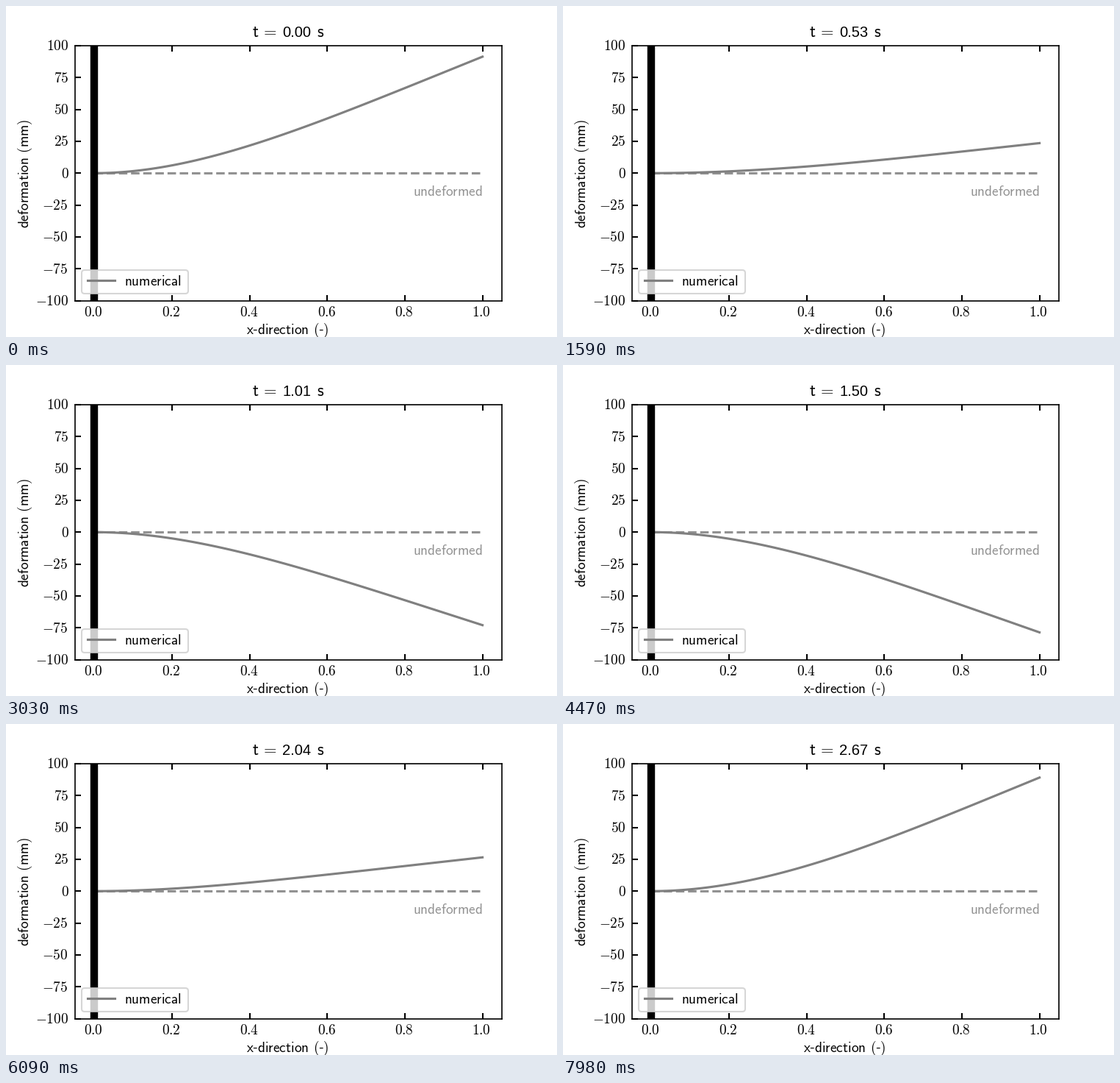
Write a matplotlib script that moves like this. It is 750 by 450 pixels and loops after 8000 ms.

```python
import matplotlib.pyplot as plt
import numpy as np
from matplotlib.animation import FuncAnimation
from matplotlib.patches import FancyBboxPatch

W, H, DPI = 750, 450, 150
LOOP, TICK, STEP = 8000, 20, 30   # ms
DT = 0.01004                      # simulated seconds per step
GRAY, LIGHT = "#808080", "#929292"

plt.rcParams.update({
    "font.family": "Liberation Sans",
    "font.size": 9.25,
    "mathtext.fontset": "cm",
    "axes.linewidth": 0.8,
    "lines.linewidth": 1.5,
})

fig = plt.figure(figsize=(W / DPI, H / DPI), dpi=DPI, facecolor="white")
ax = fig.add_axes([0.125, 0.11, 0.775, 0.77])
ax.set_xlim(-0.05, 1.05)
ax.set_ylim(-100, 100)
ax.set_xticks(np.arange(6) / 5)
ax.set_yticks(np.arange(-100, 101, 25))
ax.tick_params(direction="in", length=4, width=1, top=True,
               labelbottom=False, labelleft=False)

# overlay in pixel coordinates, y pointing down
ui = fig.add_axes([0, 0, 1, 1], zorder=2)
ui.set_xlim(0, W)
ui.set_ylim(H, 0)
ui.axis("off")


def sans(s):
    """Sans-serif math text; hyphens stay outside math mode."""
    s = s.replace(" =", r"\hspace{0.18}=").replace(" ", r"\hspace{0.38}")
    parts = [r"$\mathsf{%s}$" % p if p else "" for p in s.split("-")]
    return "-".join(parts)


def label(x, y, s, ha="center", **kw):
    return ui.text(x, y, s, ha=ha, va="baseline", **kw)


def number(x, y, s, ha):
    """Tick label, moved left by the blank edge of its first glyph."""
    edge = 1.7 if s[0] in "-1" else 0.8
    label(x - edge, y, "$%s$" % s, ha)


# cantilever vibration modes, scaled to one at the free end
def mode(beta, sigma, x):
    def raw(z):
        return np.cosh(z) - np.cos(z) - sigma * (np.sinh(z) - np.sin(z))
    return raw(beta * x) / raw(beta)


AMP, MIX = 91.4, 0.0078
OMEGA, PHASE = 2.4555, 0.008
RATIO = (4.69409 / 1.87510) ** 2
x = np.linspace(0, 1, 101)
first = mode(1.87510, 0.734096, x)
second = mode(4.69409, 1.018467, x)


def shape(t):
    return AMP * ((1 + MIX) * first * np.cos(OMEGA * t + PHASE)
                  - MIX * second * np.cos(RATIO * OMEGA * t))


ax.plot([0, 1], [0, 0], "--", color=LIGHT, zorder=2)
beam, = ax.plot(x, shape(0), color=GRAY, zorder=3)
ax.plot([0, 0], [-100, 100], color="black", lw=5, zorder=4)

# axis labels
for v in ax.get_xticks():
    number(120.2 + 528.4 * v, 421.5, "%.1f" % v, "center")
for v in ax.get_yticks():
    number(86.5, 227.25 - 1.7325 * v + 6.4, "%d" % v, "right")
label(383, 446, sans("x-direction (-)"))
label(30.5, 228, sans("deformation (mm)"), rotation=90,
      rotation_mode="anchor")
label(648.6, 258, sans("undeformed"), "right", color=LIGHT)

# title
label(335.4, 42, sans("t ="), "left", fontsize=10.8)
clock = label(376, 42, "", "left", fontsize=9.7)
label(423.3, 42, sans("s"), "left", fontsize=10.8)

# legend
ui.add_patch(FancyBboxPatch((103.1, 359), 144.7, 32.1,
                            boxstyle="round,pad=0,rounding_size=3.75",
                            fc="white", ec="0.8", lw=1, alpha=0.8, snap=True))
ui.plot([110.6, 148.1], [372.8, 372.8], color=GRAY)
label(161.3, 380, sans("numerical"), "left")


def update(i):
    t = (i * TICK + TICK // 2) // STEP * DT
    beam.set_ydata(shape(t))
    clock.set_text("%.2f" % t)
    return beam, clock


anim = FuncAnimation(fig, update, frames=LOOP // TICK, interval=TICK,
                     repeat=True, repeat_delay=0, blit=False)
plt.show()
```
